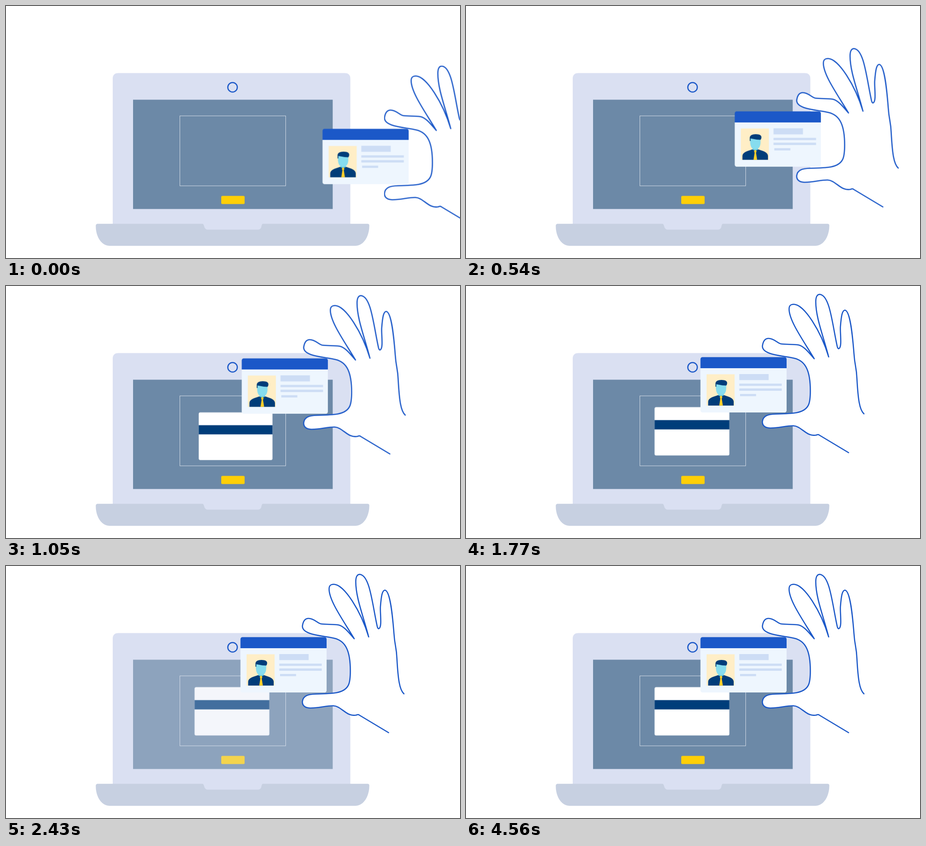
Write an HTML page that moves like this. It is 1004x558 px and loops after 4590 ms.

```html
<!DOCTYPE html>
<html lang="en">
<head>
<meta charset="utf-8">
<title>Card scan</title>
<style>
  html, body { margin: 0; width: 100%; height: 100%; overflow: hidden; background: #fff; }
  svg { display: block; width: 100vw; height: 100vh; }
</style>
</head>
<body>
<svg viewBox="0 0 1004 558">
  <defs>
    <clipPath id="screenArea"><rect x="281" y="207.5" width="441.5" height="242"/></clipPath>
    <clipPath id="idArea"><rect x="518.5" y="157.5" width="190.5" height="122.5" rx="4.5"/></clipPath>
  </defs>

  <!-- laptop -->
  <path fill="#dae0f2" d="M236 484V161q0-12.500 12.500-12.500H749q12.500 0 12.500 12.500V484H570V498H430V484z"/>
  <path fill="#c7d0e1" d="M203 482.300H434q3 0 4 5q2 8 8 8H557q7 0 8-8q1-5 3-5H799.500q4 0 4 4C803.500 511 790 531 773 531H229C211 531 198.500 511 198.500 487q0-4.700 4.500-4.700z"/>
  <circle cx="501" cy="180" r="10.500" fill="none" stroke="#1b58c8" stroke-width="2.500"/>

  <g clip-path="url(#screenArea)">
    <g id="screen">
      <rect x="281" y="207.500" width="441.500" height="242" fill="#6c89a7"/>
      <rect x="384.500" y="243.300" width="234" height="154.900" fill="none" stroke="#d3dce6" stroke-width="1"/>
      <rect x="476" y="420.500" width="51.700" height="18" rx="2.500" fill="#ffcf06"/>
      <g id="scan">
        <rect x="-82.700" y="-53.500" width="165.400" height="107" rx="3.500" fill="#fff"/>
        <rect x="-82.700" y="-24.800" width="165.400" height="20.600" fill="#003d7a"/>
      </g>
    </g>
  </g>

  <g id="hand">
    <path fill="#fff" stroke="#1b58c8" stroke-width="2.600" stroke-linecap="round" stroke-linejoin="round"
      d="M846 369L781 330Q779 328 775 330C753 335 742 310 724 309.500C708 309 692 315 672 314.500
         C660 314 655 308 655.500 300C657 287 668 284 685 283.500C705 283 720 282.500 731 280.500
         C760 275 761.500 258 761.500 232C761.500 190 752 166 726 160C700 154 655 153 655.500 133
         C657 122 662 116 669 116C681 116 688 126 696 128C708 130 722 128.500 735 130.500
         C748 133 760 150 770 161C745 119 714.500 77 714.500 51C714.500 43 718 40.500 725 40.500
         C748 41 785 100 802 157C790 110 773.500 70 773.500 35C773.500 23 777 18.500 782.500 18.500
         C805 21 810 85 821 134Q822.500 140 825 138.500C832 134 827 105 828 90
         C830 65 832 54 838 53.500C850 55 855 112 858 150C860 180 863.500 178 864.500 205
         C867 250 870 274 880 283"/>
    <g clip-path="url(#idArea)">
      <rect x="518" y="157" width="192" height="124" fill="#eef6fe"/>
      <rect x="518" y="157" width="192" height="25" fill="#1b58c8"/>
      <rect x="532" y="195.500" width="62" height="69.500" fill="#ffeec6"/>
      <path fill="#86dcee" d="M552.500 217H575.500V226C575.500 233 573 238 570 240V245H558V240C554 237 552 232 552.500 217z"/>
      <path fill="#5cc5df" d="M558 240Q564 244 570 240V243.500H558z"/>
      <path fill="#003d79" d="M551.700 223V215Q553 208 565 208Q577.500 208 577.500 215Q577.500 219 575.500 220.500Q564 220 553.500 217.500V223z"/>
      <path fill="#003d79" d="M535.500 264.700V256C536 248 546 245.500 557 241.700L564 245L571 241.700C582 245.500 591.500 248 592 256V264.700z"/>
      <path fill="#ffd02a" d="M564 242L567 246L565.500 249L568 264.700H560L562.500 249L561 246z"/>
      <g fill="#cdddf5">
        <rect x="604.300" y="195" width="65" height="13.400"/>
        <rect x="604.300" y="216.200" width="94" height="5"/>
        <rect x="604.300" y="226.800" width="94" height="5.200"/>
        <rect x="606" y="239" width="35.500" height="5"/>
      </g>
    </g>
  </g>
</svg>
<script>
  const LOOP = 4590;
  const TICK = 30;

  // Each step: [time in ms, properties, easing to the next step]
  function track(id, steps) {
    const frames = steps.map(([ms, props, easing = 'linear']) =>
      ({ offset: ms / LOOP, easing, ...props }));
    const animation = document.getElementById(id)
      .animate(frames, { duration: LOOP, fill: 'both' });
    animation.pause();
    return animation;
  }

  const place = (x, y, scale = 1) =>
    ({ transform: `translate(${x}px, ${y}px) scale(${scale})` });
  const fade = opacity => ({ opacity });

  const tracks = [
    track('hand', [
      [0, place(181.5, 114.5)],
      [30, place(181.5, 114.5), 'ease-out'],
      [540, place(75.8, 75.8), 'ease-out'],
      [1140, place(0, 0)],
      [LOOP, place(0, 0)]
    ]),
    track('scan', [
      [0, place(720.5, 620.5, 0.62)],
      [540, place(720.5, 620.5, 0.62), 'ease-out'],
      [1140, place(499.7, 321.7)],
      [LOOP, place(499.7, 321.7)]
    ]),
    track('scan', [
      [0, fade(0)],
      [540, fade(0)],
      [830, fade(1)],
      [LOOP, fade(1)]
    ]),
    track('screen', [
      [0, fade(1)],
      [2100, fade(1), 'ease-out'],
      [2340, fade(0.46), 'ease-out'],
      [2640, fade(1)],
      [LOOP, fade(1)]
    ])
  ];

  // The picture advances in whole ticks.
  const start = performance.now();
  function draw() {
    const time = (performance.now() - start) % LOOP;
    for (const t of tracks) t.currentTime = Math.floor(time / TICK) * TICK;
    requestAnimationFrame(draw);
  }
  draw();
</script>
</body>
</html>
```
